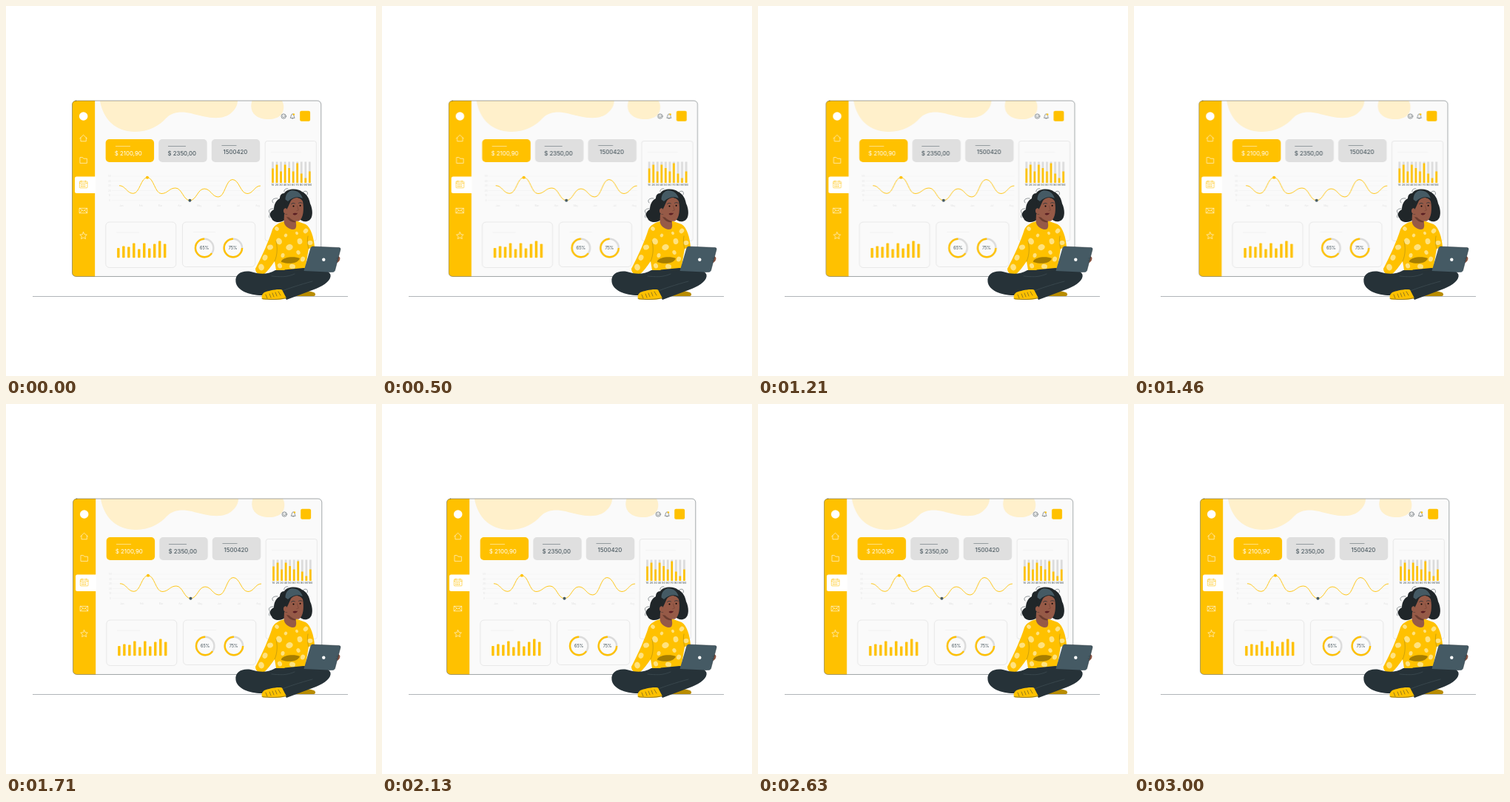
Recreate the animation shown at these times as an HTML page. Size 500 by 500 pixels, loop 3040 ms.

```html
<!DOCTYPE html>
<html lang="en">
<head>
<meta charset="utf-8">
<title>Dashboard</title>
<style>
  html, body { margin: 0; width: 100%; height: 100%; overflow: hidden; background: #fff; }
  svg { display: block; width: 100vw; height: 100vh; }
  text { font-family: Inter, Roboto, sans-serif; }
  .panel { animation: shake 3.04s linear infinite; }
  /* the shake takes 3 s, then rests until the loop restarts */
  @keyframes shake {
    0%, 98.68%, 100% { transform: translateX(0); }
    9.87%, 88.82% { transform: translateX(-.6px); }
    19.74%, 78.95% { transform: translateX(1.2px); }
    29.61%, 49.34%, 69.08% { transform: translateX(-2.4px); }
    39.47%, 59.21% { transform: translateX(2.4px); }
  }
  .y { fill: #ffc100; }
  .dark { fill: #263238; }
  .skin { fill: #965a47; }
  .box { fill: none; stroke: #dcdcdc; stroke-width: .6; }
  .rule { fill: none; stroke: #ebebeb; stroke-width: .5; }
  .icon { fill: none; stroke: #fff; stroke-width: .6; stroke-linejoin: round; stroke-linecap: round; }
  .ink { fill: none; stroke: #263238; stroke-width: .5; stroke-linecap: round; stroke-linejoin: round; }
</style>
</head>
<body>
<svg viewBox="0 0 500 500">
  <defs>
    <clipPath id="frame"><rect x="89.5" y="128" width="336.3" height="237.5" rx="5"/></clipPath>
    <clipPath id="top"><path id="torso" d="M376 291C368 293 362 297 360 302C355 318 346 338 337 355C337 360 340 363 348 363C353 359 358 352 363 345L365 357L404 357L409 328L417 326C416 313 412 299 405 295L391 290Z"/></clipPath>
  </defs>
  <g class="panel">
    <g clip-path="url(#frame)">
      <rect x="89" y="127" width="338" height="240" fill="#fafafa"/>
      <g fill="#fff0cb">
        <path d="M127 128C130 147 142 165 164 169C188 173 206 163 216 152C224 143 237 142 250 145C271 151 294 156 306 143C311 138 313 133 313 128Z"/>
        <path d="M332.5 128C329 138 333 148 344 151.5C356 155 371 153 374.5 142C376 137 375.5 132 373 128Z"/>
      </g>
      <rect class="y" x="89" y="127" width="31.2" height="240"/>
    </g>
    <path d="M121 230.5H95.5Q93 230.5 93 233V250.5Q93 253 95.5 253H121Z" fill="#fff"/>
    <circle cx="104.7" cy="149" r="5.8" fill="#fff"/>
    <g class="icon">
      <path d="M99.7 179L104.6 174.3L109.5 179M101 178V182.8H108.3V178"/>
      <path d="M100 212V204.6H103.5L104.8 206.2H109.4V212Z"/>
      <path d="M99.5 273.3H109.7V279.8H99.5ZL104.6 277.2L109.7 273.3M99.5 279.8L103 276M109.7 279.8L106.2 276"/>
      <path id="star"/>
    </g>
    <g class="icon" style="stroke:#ffc100">
      <rect x="99.4" y="237" width="10.6" height="8.8" rx=".8"/>
      <path d="M99.4 239.4H110M102 236V238M107.3 236V238"/>
      <path d="M101.7 241.5H108M101.7 243.7H108" stroke-width="1.2" stroke-dasharray=".4 1.9"/>
    </g>
    <rect x="89.5" y="128" width="336.3" height="237.5" rx="5" class="ink" stroke-opacity=".85"/>

    <g class="ink">
      <circle cx="375.2" cy="149" r="3.2"/>
      <path d="M373.6 149.3C374 151 376.4 151 376.8 149.3M374 147.7V148M376.4 147.7V148"/>
      <path d="M384.5 151C385.5 149.5 385 146 387.2 145.8C389.4 146 388.9 149.5 389.9 151ZM386.6 152H387.8"/>
    </g>
    <circle class="y" cx="388.9" cy="146.4" r="1.2"/>
    <rect class="y" x="397.2" y="141.8" width="13.9" height="14" rx="2"/>

    <rect class="y" x="134.7" y="180" width="65.4" height="31" rx="5"/>
    <rect x="206.3" y="180" width="65.4" height="31" rx="5" fill="#dfdfdf"/>
    <rect x="277.8" y="180" width="65.4" height="31" rx="5" fill="#dfdfdf"/>
    <path d="M148 189.5H168" stroke="#fff" stroke-width=".5"/>
    <path d="M219 189.5H243M291.5 188.5H311.5" stroke="#37474f" stroke-width=".45"/>
    <g font-size="7.9">
      <text x="146.7" y="202" fill="#fff">$ 2100,90</text>
      <text x="218.5" y="202" fill="#37474f">$ 2350,00</text>
      <text x="293.6" y="200.4" fill="#37474f">1500420</text>
    </g>

    <g id="grid" class="rule" stroke-opacity=".7"></g>
    <g id="axis" font-size="3" fill="#e0e0e0" text-anchor="middle"></g>
    <path id="curve" fill="none" stroke="#ffc100" stroke-width=".9"/>
    <circle class="y" cx="191" cy="231.7" r="2"/>
    <circle cx="248.5" cy="262.7" r="2" fill="#455a64"/>

    <rect class="box" x="134.8" y="292" width="95" height="61.5" rx="5"/>
    <rect class="box" x="238.5" y="292" width="98.3" height="60.5" rx="5"/>
    <rect class="box" x="350.2" y="182.5" width="69.2" height="135" rx="3"/>
    <path class="rule" d="M149 306H180M253 305.5H283M358 197.7H399"/>
    <g id="bars"></g>
    <g id="levels"></g>
    <g id="rings" fill="none" stroke-width="2.4"></g>
    <g font-size="5.5" fill="#37474f" text-anchor="middle">
      <text x="268.2" y="329.3">65%</text><text x="306.7" y="329.3">75%</text>
    </g>
  </g>

  <path d="M36 392.5H462" stroke="#263238" stroke-width=".45" stroke-opacity=".8"/>

  <g id="woman">
    <path fill="#202629" d="M376 253C380 246 395 246 400 251C407 254 410 261 411 267C415 275 415 286 410 289.5C405 293 399 291 396 287L378 288C372 294 361 293 359 287C355 283 357 277 362 275C362 267 366 262 370 260C370 256 372 253 376 253Z"/>
    <path class="ink" d="M363 274C357 273 354 276 356 279C358 282 354 284 356 286M367 260C361 259 358 263 361 266M401 252C405 248 409 251 407 255M376 251C375 248 379 246 381 247"/>
    <use href="#torso" class="y"/>
    <g id="spots" clip-path="url(#top)" fill="#ffe27f"></g>
    <path class="ink" stroke-opacity=".45" d="M363 345C367 336 367 326 365 318M409 328C407 321 407 315 408 311"/>
    <path class="skin" d="M376 281L375.5 291C376 299 386 304 391 301C393 298 392 294 391.5 290L391 284Z"/>
    <path d="M379 285C382 290 387 293 391.5 292L391 287Z" fill="#6b3d30"/>
    <path class="skin" d="M381 262C387 257 398 258 401 264C403 274 402 287 396 290.5C390 292 383 288 380 281.5C375.5 282 374 277 375.5 274.5C377 272.5 379 273 380 275Z"/>
    <path d="M376 264C377 256 381 250 387 249.5C394 249 400 254 401.5 262C396 257.5 389 258.5 385 263L380.5 273C377.5 270 375.5 267 376 264Z" fill="#202629"/>
    <path d="M377.5 261.5C377.5 255 381 250.5 386 249.3C393 249 399 253 400.8 260C395 256.5 387 258 381 264Z" fill="#455a64"/>
    <g class="ink">
      <path d="M385.5 267.5C387 266 389 266 390.5 267M395.5 266.3C397 265.3 399 265.5 400 266.3" stroke-width=".8"/>
      <path d="M393.5 270L395.3 276L392.8 276.7" style="stroke:#6b3d30"/>
    </g>
    <circle cx="388.5" cy="270.5" r="1"/><circle cx="397.6" cy="269.8" r="1"/>
    <path d="M387.5 281C389.5 279 391.5 280.2 394 279.8C393 282.8 389.5 283.5 387.5 281Z" fill="#5a1f23"/>

    <path d="M372 345C374 339 390 338 397 341C395 347 385 350 372 346Z" fill="#a57d00"/>
    <path d="M388 388C398 384 410 384 417 387.5C419 390 418 392 415 392H389Z" fill="#b88c00"/>
    <path class="dark" d="M364 357H405C421 355 436 356 438.5 363C440 370 431 377 419 382L379 397L372 386L346 391C328 391 312 384 310.5 373C309 362 319 357 331 359C341 362 352 364 364 357Z"/>
    <path class="ink" style="stroke:#4b5a61" d="M359 365C370 366 379 367 390 362M371 386C383 381 396 377 414 372"/>
    <path class="y" d="M349 387C355 385 366 382 373 383.5L379 395C370 398 354 397 347 396.5C344 394 346 389 349 387Z"/>
    <path class="ink" d="M356 389L358 394M360 388L362 393M364 387L366 392M368 386L371 391M351 390L353 395M346 395.5C356 397 368 397 379 394.5" stroke-width=".7"/>

    <path class="skin" d="M444 340C447 336 451 338 451.5 341C451 345 448 348 444 347Z"/>
    <path class="dark" d="M376 356.5L402 354L443 359.8L379 358Z"/>
    <path d="M414 325L450 326.5Q452.5 326.7 452 329L444.5 357.5Q443.8 359.8 441.5 359.7L402.5 358L411.5 327Q412 325 414 325Z" fill="#455a64"/>
    <path class="ink" d="M414 325L450 326.5Q452.5 326.7 452 329L444.5 357.5"/>
    <circle cx="429.3" cy="342.8" r="2.2" fill="#fff"/>
    <path class="ink" d="M446.5 341L450.5 340.5M446 344L450 343.5" stroke-opacity=".6"/>
  </g>
</svg>
<script>
  const $ = id => document.getElementById(id);
  const rect = (x, y, w, h, fill, r = 0) =>
    `<rect x="${x}" y="${y}" width="${w}" height="${h}" rx="${r}" fill="${fill}"/>`;
  const label = (x, y, s) => `<text x="${x}" y="${y}">${s}</text>`;
  const yellow = '#ffc100';

  // Wave with level tangents at each turning point
  const turns = [[153, 242.7], [172, 253.3], [191, 231.7], [210, 253.5], [229, 246], [248.5, 262.7],
                 [268, 247], [287, 258], [306, 234.5], [326, 253.5], [344, 243]];
  $('curve').setAttribute('d', turns.map(([x, y], i) => {
    if (!i) return `M${x} ${y}`;
    const [px, py] = turns[i - 1], k = (x - px) * .46;
    return `C${px + k} ${py} ${x - k} ${y} ${x} ${y}`;
  }).join(''));

  for (let i = 0; i < 6; i++) {
    const y = 230 + i * 6.5;
    $('grid').innerHTML += `<path d="M143 ${y}H344"/>`;
    $('axis').innerHTML += label(140, y + 1, 50 - i * 10);
  }
  ['Jan', 'Feb', 'Mar', 'Apr', 'May', 'Jun', 'Jul', 'Aug'].forEach((m, i) => {
    $('axis').innerHTML += label(156 + i * 26.3, 271, m);
  });

  [327, 324.5, 325.5, 320.5, 328.5, 320.5, 327.5, 321.5, 317.5, 321.5].forEach((y, i) => {
    $('bars').innerHTML += rect(150.2 + i * 6.98, y, 3.4, 340.2 - y, yellow, .8);
  });

  let levels = '';
  [219.5, 214.5, 223.5, 214.5, 219, 223.5, 212.5, 226.5, 232.5, 223.5].forEach((y, i) => {
    const x = 360.5 + i * 5.54;
    levels += rect(x - 1.35, 210.5, 2.7, 28.5, '#dbdbdb') + rect(x - 1.35, y, 2.7, 239 - y, yellow) +
      `<text x="${x}" y="242.9" font-size="3.7" text-anchor="middle" fill="#37474f">${(i + 1) * 10}</text>`;
  });
  $('levels').innerHTML = levels;

  [[268.2, 65], [306.9, 75]].forEach(([x, pct]) => {
    const ring = (color, extra) =>
      `<circle cx="${x}" cy="327" r="12.2" stroke="${color}" pathLength="100" transform="rotate(-90 ${x} 327)" ${extra}/>`;
    $('rings').innerHTML += ring('#dbdbdb', '') +
      ring(yellow, `stroke-dasharray="${pct} ${100 - pct}" stroke-dashoffset="${pct}"`);
  });

  $('star').setAttribute('d', 'M' + Array.from({ length: 10 }, (_, i) => {
    const a = i * Math.PI / 5, r = i % 2 ? 2.4 : 5;
    return `${104.6 + r * Math.sin(a)} ${310.6 - r * Math.cos(a)}`;
  }).join('L') + 'Z');

  [[366, 301, 3], [378, 310, 2.5], [369, 318, 4.5], [383, 326, 4.8], [397, 318, 4], [405, 304, 3.5],
   [357, 326, 4], [350, 340, 4], [345, 353, 4.5], [374, 337, 3], [395, 333, 3], [401, 342, 3.5],
   [370, 351, 3.5], [387, 352, 4], [411, 320, 3.5], [393, 307, 2.2]].forEach(([x, y, r]) => {
    $('spots').innerHTML += `<ellipse cx="${x}" cy="${y}" rx="${r}" ry="${r * .85}" transform="rotate(${x * 7} ${x} ${y})"/>`;
  });
</script>
</body>
</html>
```
